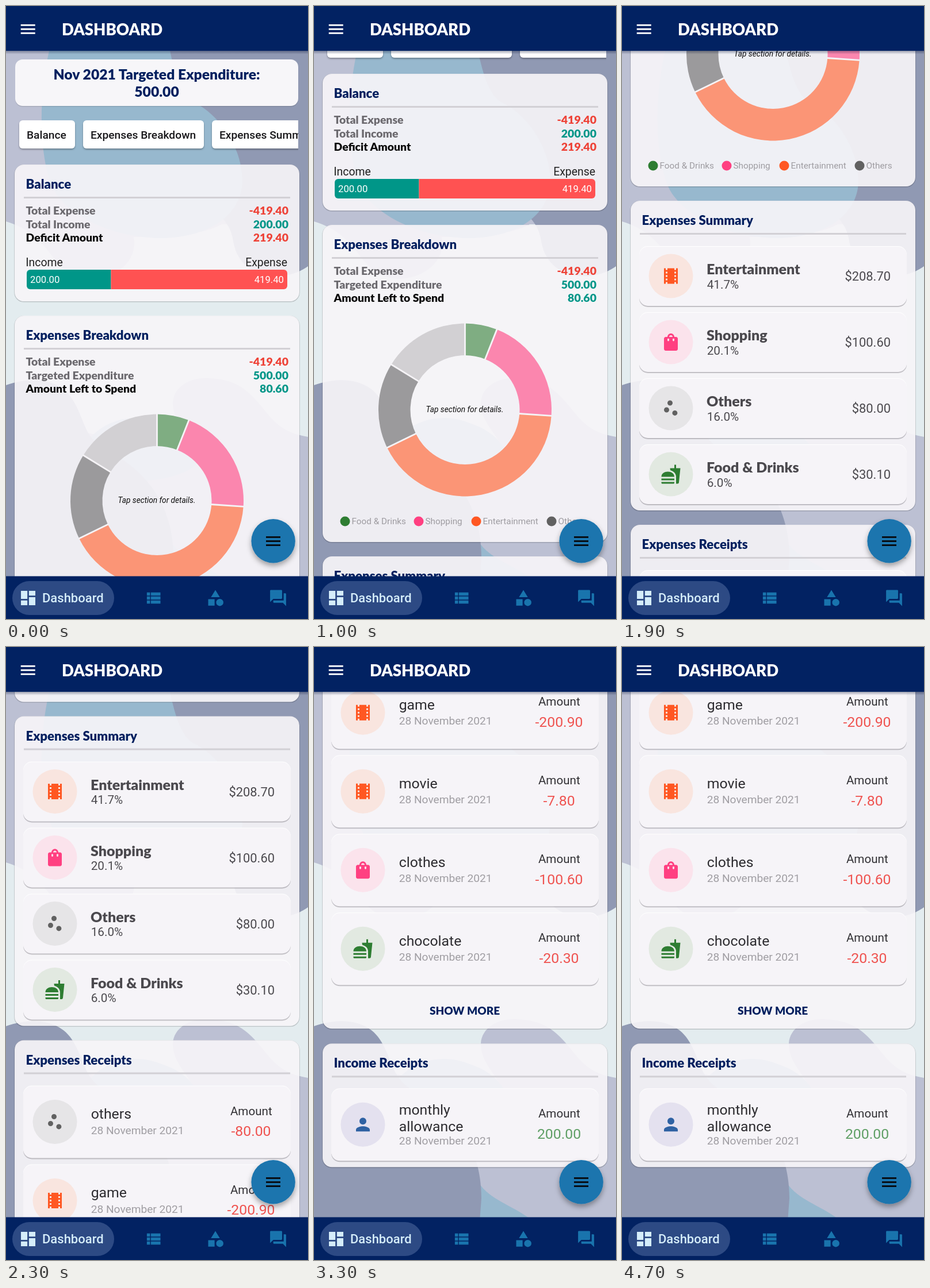
These frames come from a looping animation (525 by 1067 pixels, 4800 ms). An HTML page:

```html
<!DOCTYPE html>
<html lang="en">
<head>
<meta charset="utf-8">
<title>Dashboard</title>
<style>
  html, body { margin: 0; width: 100%; height: 100%; overflow: hidden; background: #e3ecef; }
  svg { display: block; width: 100%; height: 100%; }
  text { font-family: Roboto, sans-serif; white-space: pre; }
  .l { font-family: Lato, sans-serif; font-weight: 900; }
  .m { font-weight: 500; }
  .i { font-style: italic; }
</style>
</head>
<body>
<svg id="stage" viewBox="0 0 525 1067" xmlns="http://www.w3.org/2000/svg">
  <defs>
    <clipPath id="view"><rect y="78" width="525" height="915"/></clipPath>
    <clipPath id="chipRow"><rect x="16" y="190" width="492" height="70"/></clipPath>
    <clipPath id="barClip"><rect x="36" y="459" width="453" height="34" rx="6"/></clipPath>
    <linearGradient id="fade" x2="0" y2="1">
      <stop stop-color="#000c30" stop-opacity=".35"/>
      <stop offset="1" stop-color="#000c30" stop-opacity="0"/>
    </linearGradient>
    <filter id="lift" x="-30%" y="-30%" width="160%" height="170%">
      <feDropShadow dx="0" dy="5" stdDeviation="5" flood-color="#000" flood-opacity=".35"/>
    </filter>
    <filter id="soft" x="-10%" y="-20%" width="120%" height="160%">
      <feDropShadow dx="0" dy="2" stdDeviation="1.6" flood-color="#000" flood-opacity=".32"/>
    </filter>
  </defs>

  <g id="backdrop">
    <rect width="525" height="1067" fill="#e3ecef"/>
    <path fill="#bcc0d3" d="M0 78H525V380H375C350 395 300 402 222 402C230 445 190 475 145 475C75 470 85 400 0 375Z"/>
    <path fill="#9099b3" d="M285 78H525V453C490 478 440 475 415 450C385 418 405 400 375 368L300 250Z"/>
    <path fill="#97b8ce" d="M75 78H285C292 110 302 152 325 167C360 182 410 235 411 305C410 365 350 404 268 404C175 402 105 360 83 320C62 280 52 180 75 78Z"/>
    <path fill="#bcc0d3" d="M290 690C292 660 325 645 355 648C410 650 430 680 455 710C475 735 495 745 525 750V1067H130V740L335 790C322 742 290 730 290 690Z"/>
    <path fill="#97b8ce" d="M140 760C170 718 225 708 268 725C310 738 335 765 335 790C325 815 260 830 220 825ZM286 932C305 962 345 972 375 995H270Z"/>
    <path fill="#9099b3" d="M0 660C45 644 95 648 117 687C138 722 135 750 172 772C235 803 291 860 291 960L288 1000H0Z"/>
  </g>

  <g clip-path="url(#view)"><g id="content"></g></g>
  <g id="chrome"></g>
</svg>

<script>
const LOOP = 4800, STEP = 100;
const NAVY = '#02205f', RED = '#ee4338', TEAL = '#009688', GREY = '#6b696e';

const icons = {
  film: ['#ff5722', '#f9e5df', 'M18 3v2h-2V3H8v2H6V3H4v18h2v-2h2v2h8v-2h2v2h2V3zM8 17H6v-2h2zm0-4H6v-2h2zm0-4H6V7h2zm10 8h-2v-2h2zm0-4h-2v-2h2zm0-4h-2V7h2z'],
  bag: ['#ff4081', '#fbe3ec', 'M18 6h-2c0-2.2-1.8-4-4-4S8 3.8 8 6H6c-1.1 0-2 .9-2 2v12c0 1.1.9 2 2 2h12c1.1 0 2-.9 2-2V8c0-1.1-.9-2-2-2zM10 10c0 1.3-2 1.3-2 0V8h2zm2-6c1.1 0 2 .9 2 2h-4c0-1.1.9-2 2-2zm4 6c0 1.3-2 1.3-2 0V8h2z'],
  dots: ['#616161', '#e6e5e7', 'M4 14a3 3 0 1 0 6 0a3 3 0 1 0-6 0M8 6a3 3 0 1 0 6 0a3 3 0 1 0-6 0M13.6 17.6a3 3 0 1 0 6 0a3 3 0 1 0-6 0'],
  food: ['#2e7d32', '#e2e9e1', 'M18 23h1.7c.8 0 1.5-.6 1.6-1.5L23 5h-5V1h-2v4h-5l.3 2.4c1.7.5 3.3 1.3 4.3 2.3 1.4 1.4 2.4 2.9 2.4 5.3zM1 22v-1h15v1c0 .6-.4 1-1 1H2c-.6 0-1-.4-1-1zM16 15C16 7 1 7 1 15zM1 17h15v2H1z'],
  person: ['#2f62a3', '#e4e1ef', 'M12 12a4 4 0 1 0 0-8a4 4 0 0 0 0 8zm0 2c-2.7 0-8 1.3-8 4v2h16v-2c0-2.7-5.3-4-8-4z']
};

const rect = (x, y, w, h, fill, r = 0, more = '') =>
  `<rect x="${x}" y="${y}" width="${w}" height="${h}" rx="${r}" fill="${fill}" ${more}/>`;
const circle = (x, y, r, fill, more = '') =>
  `<circle cx="${x}" cy="${y}" r="${r}" fill="${fill}" ${more}/>`;
const text = (s, x, y, size, fill, cls = '', anchor = 'start') =>
  `<text x="${x}" y="${y}" font-size="${size}" fill="${fill}" class="${cls}" text-anchor="${anchor}">${s.replace('&', '&amp;')}</text>`;
const glyph = (d, x, y, scale, fill) =>
  `<path d="${d}" fill="${fill}" fill-rule="evenodd" transform="translate(${x} ${y}) scale(${scale}) translate(-12 -12)"/>`;
const bars = (x, y, fill) => [-7, 0, 7].map(d => rect(x, y + d - 1.4, 25, 2.8, fill)).join('');

function panel(y, bottom, title) {
  const h = bottom - y;
  return rect(15, y + .8, 495, h, 'none', 16, 'stroke="#000" stroke-width="1.6" opacity=".17"') +
    rect(15, y, 495, h, 'rgba(248,246,249,.91)', 16) +
    text(title, 34.5, y + 42, 22.2, NAVY, 'l') +
    rect(31, y + 56, 463, 3, '#d2d0d5');
}

function tile(y, h, icon) {
  const [ink, tint, d] = icons[icon], mid = y + h / 2 - .5;
  return rect(30, y + 2, 465, h, '#55525c', 15, 'opacity=".32"') +
    rect(30, y - 1, 465, h, '#fff', 15) +
    rect(30, y, 465, h, '#f6f4f8', 15) +
    circle(85, mid, 38.5, tint) + glyph(d, 85, mid, 1.5, ink);
}

function totals(y, rows) {
  return rows.map(([label, value, ink, valueInk], i) =>
    text(label, 34.5, y + i * 23.5, 19.4, ink, 'l') +
    text(value, 491, y + i * 23.5, 19.5, valueInk, 'l', 'end')).join('');
}

function receipt(y, icon, lines, value, ink) {
  const two = lines.length > 1;
  return tile(y, 125, icon) +
    lines.map((s, i) => text(s, 147.7, y + (two ? 45 + i * 29 : 56.5), 24.8, '#2d2c30')).join('') +
    text('28 November 2021', 147.7, y + (two ? 97 : 83), 19.15, '#a09ea3') +
    text('Amount', 426.3, y + 50, 20.6, '#323135', '', 'middle') +
    text(value, 426, y + 86.5, 24.8, ink, '', 'middle');
}

function donut(cx, cy, outer, inner) {
  const slices = [[6, '#7fad82'], [20.1, '#fb86ae'], [41.7, '#fb9576'], [16, '#9b9a9c'], [16.2, '#d2d0d3']];
  const at = (p, r) => {
    const a = p / 50 * Math.PI;
    return `${(cx + r * Math.sin(a)).toFixed(2)} ${(cy - r * Math.cos(a)).toFixed(2)}`;
  };
  let from = 0, fills = '', gaps = '';
  for (const [share, fill] of slices) {
    const to = from + share;
    fills += `<path fill="${fill}" d="M${at(from, outer)}A${outer} ${outer} 0 0 1 ${at(to, outer)}L${at(to, inner)}A${inner} ${inner} 0 0 0 ${at(from, inner)}Z"/>`;
    gaps += `<path stroke="#f5f3f6" stroke-width="2.8" d="M${at(from, inner - 1)}L${at(from, outer + 1)}"/>`;
    from = to;
  }
  return fills + gaps;
}

function buildContent() {
  let s = rect(16, 94.5, 492, 81, '#000', 13, 'opacity=".12"') +
    rect(16, 93, 492, 81, '#f7f6f9', 13) +
    text('Nov 2021 Targeted Expenditure:', 262, 128, 24.7, NAVY, 'l', 'middle') +
    text('500.00', 262, 158, 24.7, NAVY, 'l', 'middle');

  const chips = [['Balance', 23, 97], ['Expenses Breakdown', 134, 210], ['Expenses Summary', 358, 200]];
  s += '<g clip-path="url(#chipRow)">' + chips.map(([label, x, w]) =>
    rect(x, 199, w, 49, '#fff', 6, 'filter="url(#soft)"') +
    text(label, x + 13, 231, 19.2, '#19181b', 'm')).join('') + '</g>';

  s += panel(276, 514, 'Balance') + totals(363, [
    ['Total Expense', '-419.40', GREY, RED],
    ['Total Income', '200.00', GREY, TEAL],
    ['Deficit Amount', '219.40', '#080808', RED]]);
  s += text('Income', 34.3, 453, 19.4, '#222') + text('Expense', 489, 453, 19.4, '#222', '', 'end') +
    '<g clip-path="url(#barClip)">' + rect(36, 459, 146.5, 34, TEAL) + rect(182.5, 459, 307, 34, '#ff5252') + '</g>' +
    text('200.00', 42, 482, 16.7, '#fff') + text('419.40', 483, 482, 16.7, '#fff', '', 'end');

  s += panel(539, 1091, 'Expenses Breakdown') + totals(626, [
    ['Total Expense', '-419.40', GREY, RED],
    ['Targeted Expenditure', '500.00', GREY, TEAL],
    ['Amount Left to Spend', '80.60', '#080808', TEAL]]);
  s += donut(262.5, 861, 150.5, 95) +
    text('Tap section for details.', 262, 865, 13.7, '#111', 'i', 'middle');
  const legend = [['Food & Drinks', 54, 'food'], ['Shopping', 182, 'bag'], ['Entertainment', 282, 'film'], ['Others', 413, 'dots']];
  s += legend.map(([label, x, icon]) =>
    circle(x, 1055, 8.5, icons[icon][0]) + text(label, x + 11.5, 1060, 15.3, '#9e9ca1')).join('');

  const summary = [['Entertainment', '41.7%', '$208.70', 'film'], ['Shopping', '20.1%', '$100.60', 'bag'],
    ['Others', '16.0%', '$80.00', 'dots'], ['Food & Drinks', '6.0%', '$30.10', 'food']];
  s += panel(1116, 1655, 'Expenses Summary') + summary.map(([name, share, sum, icon], i) => {
    const y = 1196 + i * 115;
    return tile(y, 103, icon) + text(name, 147, y + 48, 25, '#4b494e', 'l') +
      text(share, 147.7, y + 72.5, 20.7, '#4b494e') + text(sum, 467, y + 59, 21.9, '#4b494e', '', 'end');
  }).join('');

  const spent = [['others', '-80.00', 'dots'], ['game', '-200.90', 'film'], ['movie', '-7.80', 'film'],
    ['clothes', '-100.60', 'bag'], ['chocolate', '-20.30', 'food']];
  s += panel(1680, 2509, 'Expenses Receipts') +
    spent.map(([name, sum, icon], i) => receipt(1760 + i * 137, icon, [name], sum, '#ef5350')).join('') +
    text('SHOW MORE', 262, 2485, 19, NAVY, 'l', 'middle');

  return s + panel(2535, 2750, 'Income Receipts') +
    receipt(2614, 'person', ['monthly', 'allowance'], '200.00', '#5f9f65');
}

function buildChrome() {
  const blue = '#1974ad', pale = '#d5edfa', s = 1.39;
  return rect(0, 78, 525, 6, 'url(#fade)') + rect(0, 0, 525, 78, '#022262') +
    bars(25.7, 40.3, '#fff') + text('DASHBOARD', 97, 50.5, 27.5, '#fff', 'l') +
    circle(464.6, 931.3, 38.2, '#1a74ae', 'filter="url(#lift)"') + bars(452, 931.5, '#06080c') +
    rect(0, 992.5, 525, 75, '#022262') + rect(11, 1001, 177, 59, '#2d4a84', 29.5) +
    glyph('M3 13h8V3H3zm0 8h8v-6H3zm10 0h8V11h-8zm0-18v6h8V3z', 38.5, 1030.5, s, pale) +
    text('Dashboard', 63, 1038, 22, pale, 'm') +
    glyph('M4 5h4v4H4zm5 0h12v4H9zM4 10h4v4H4zm5 0h12v4H9zM4 15h4v4H4zm5 0h12v4H9z', 256, 1030.5, s, blue) +
    glyph('M12 2l-5.5 9h11zM13 17.5a4.5 4.5 0 1 0 9 0a4.5 4.5 0 1 0-9 0M3 13.5h8v8H3z', 364, 1030.5, s, blue) +
    glyph('M21 6h-2v9H6v2c0 .6.4 1 1 1h11l4 4V7c0-.6-.4-1-1-1zm-4 6V3c0-.6-.4-1-1-1H3c-.6 0-1 .4-1 1v14l4-4h10c.6 0 1-.4 1-1z', 473, 1030.5, s, blue);
}

// Scroll offset over time, joined by a monotone cubic.
const keys = [[0, 0], [500, 0], [1000, 158], [1400, 326], [1900, 777], [2300, 995.5], [3150, 1844.7], [LOOP, 1844.7]];
const slope = i => (keys[i + 1][1] - keys[i][1]) / (keys[i + 1][0] - keys[i][0]);
const tangents = keys.map((k, i) => {
  if (!i || i === keys.length - 1) return 0;
  const a = slope(i - 1), b = slope(i);
  return a * b > 0 ? 2 * a * b / (a + b) : 0;
});

function scrollAt(t) {
  let i = 0;
  while (t >= keys[i + 1][0]) i++;
  const [t0, y0] = keys[i], [t1, y1] = keys[i + 1];
  const d = t1 - t0, u = (t - t0) / d, v = 1 - u;
  return y0 * v * v * (1 + 2 * u) + y1 * u * u * (3 - 2 * u) +
    d * u * v * (tangents[i] * v - tangents[i + 1] * u);
}

const content = document.getElementById('content');
content.innerHTML = buildContent();
document.getElementById('chrome').innerHTML = buildChrome();

const start = performance.now();
function draw(now) {
  const t = Math.max(0, now - start) % LOOP;
  const y = scrollAt(Math.floor(t / STEP) * STEP);
  content.setAttribute('transform', `translate(0 ${-y.toFixed(2)})`);
  requestAnimationFrame(draw);
}
draw(start);
</script>
</body>
</html>
```
